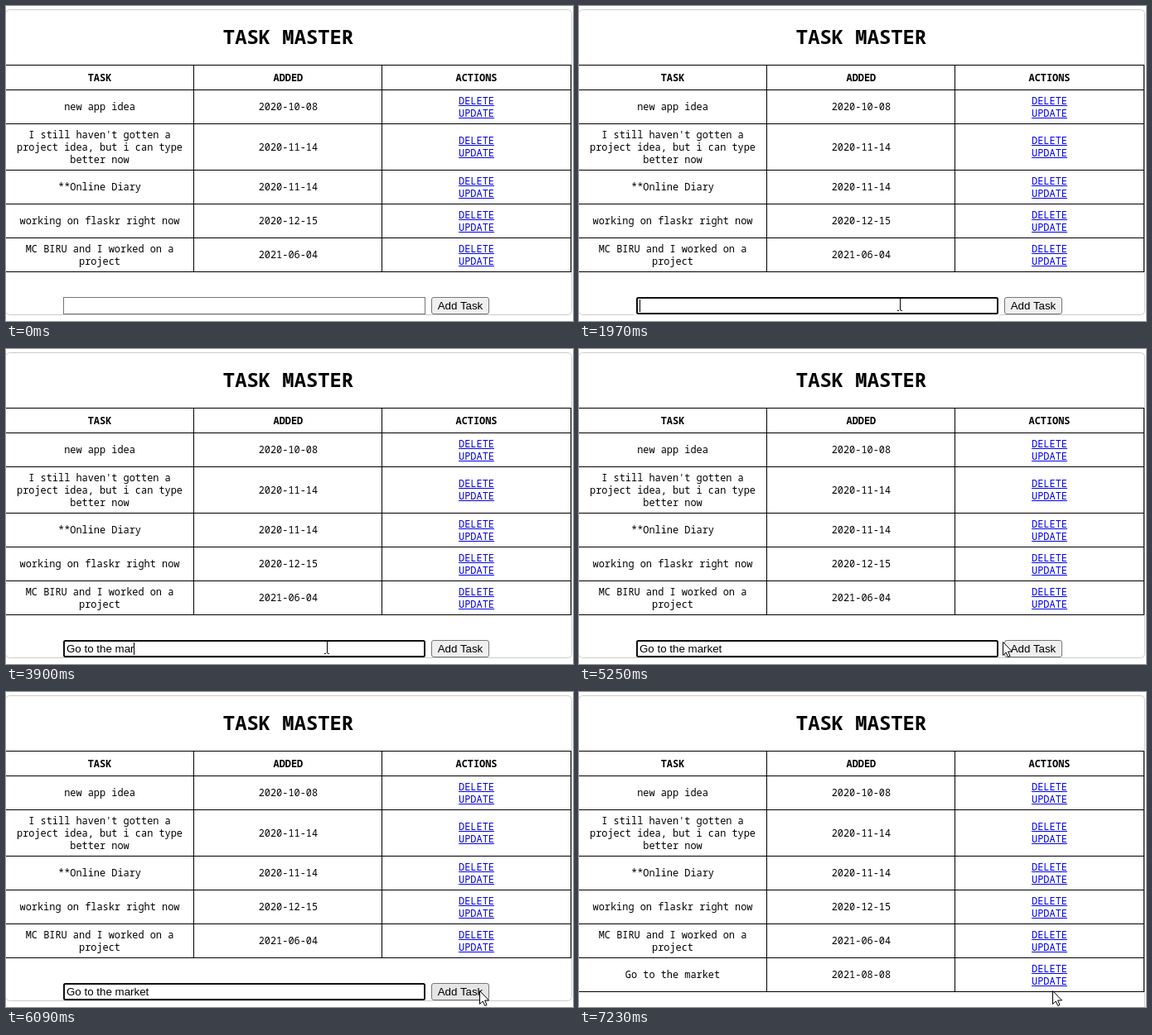
Animation of 684 by 381 pixels, one loop 8 s. Source, as an HTML page:

```html
<!DOCTYPE html>
<html lang="en">
<head>
<meta charset="utf-8">
<title>Task Master</title>
<style>
  html, body { margin: 0; width: 100%; height: 100%; overflow: hidden; background: #fff; }
  svg { display: block; width: 100%; height: 100%; }
  text { font: 11.92px "Noto Sans Mono", monospace; text-anchor: middle; white-space: pre; }
  .title { font-size: 23.83px; font-weight: 700; }
  .head { font-weight: 700; }
  .link { fill: #00e; }
  .control { font: 13.333px "Liberation Sans", Arial, sans-serif; }
  #typed { text-anchor: start; }
</style>
</head>
<body>
<svg viewBox="0 0 684 381">
  <rect id="card" x="-.5" y="4.5" width="683" height="369" rx="5" fill="#fff" stroke="#ccc"/>
  <text class="title" x="340.5" y="46">TASK MASTER</text>
  <g id="table"></g>
  <g id="newRow"></g>
  <g id="form">
    <rect id="field" fill="#fff"/>
    <text id="typed" class="control" x="73" y="367"></text>
    <rect id="caret" y="355" width="1" height="15"/>
    <rect id="button" x="513.5" y="352.5" width="69" height="20" rx="2.5" stroke="#767676"/>
    <text class="control" x="548" y="367">Add Task</text>
    <path id="popup" d="M66.5 382V373.5H507.5V382" fill="#fff" stroke="#f1f1f1"/>
  </g>
  <g id="pointer">
    <path id="arrow" d="M.5 .5V16.5L4.2 13 6.7 18.5 9 17.5 6.6 12H11.6Z" fill="#fff" stroke="#000"/>
    <path id="beam" d="M-3 -7.5H-1M1 -7.5H3M.5 -7V7M-3 7.5H-1M1 7.5H3" fill="none" stroke="#000"/>
  </g>
</svg>
<script>
const LOOP = 8000, BLINK = 530, STEP = 70;
const FOCUS = 550, SECOND_CLICK = 890, POPUP_CLOSE = 3670, PRESS = 6290, RELEASE = 6420, ADDED = 7230;
const COLUMNS = [113, 340.4, 567.5];
const TASK = 'Go to the market';
const KEY_TIMES = [2170, 2370, 2570, 2770, 2870, 2980, 3080, 3180, 3290, 3490, 3580, 3760, 3900, 4120, 4230, 4500];
const POINTER = [
  [270, 383, 375], [620, 387, 361], [4910, 387, 361], [5250, 511, 354],
  [5460, 594, 352], [5740, 583, 361], [6090, 571, 361]
];

const el = id => document.getElementById(id);
const show = (id, on) => el(id).setAttribute('display', on ? 'inline' : 'none');
const setAttrs = (id, attrs) => {
  for (const name in attrs) el(id).setAttribute(name, attrs[name]);
};

function cell(column, middle, lines, kind = '') {
  return lines.map((line, i) => {
    const x = COLUMNS[column];
    const y = Math.round(middle + 4.5 + 15 * (i - (lines.length - 1) / 2));
    const underline = kind === 'link' ? `<rect class="link" x="546" y="${y + 1}" width="43" height="1"/>` : '';
    return `<text class="${kind}" x="${x}" y="${y}">${line}</text>${underline}`;
  }).join('');
}

const grid = (top, bottom) =>
  `<path d="M0 ${bottom}.5H682M226.5 ${top}V${bottom}M453.5 ${top}V${bottom}M681.5 ${top}V${bottom}" stroke="#000"/>`;

function row(top, bottom, task, date) {
  const middle = (top + bottom) / 2;
  return grid(top, bottom) + cell(0, middle, task.split('|')) + cell(1, middle, [date]) +
    cell(2, middle, ['DELETE', 'UPDATE'], 'link');
}

el('table').innerHTML =
  '<path d="M0 71.5H682" stroke="#000"/>' + grid(71, 101) +
  ['TASK', 'ADDED', 'ACTIONS'].map((name, i) => cell(i, 86, [name], 'head')).join('') +
  row(101, 142, 'new app idea', '2020-10-08') +
  row(142, 198, "I still haven't gotten a|project idea, but i can type|better now", '2020-11-14') +
  row(198, 239, '**Online Diary', '2020-11-14') +
  row(239, 280, 'working on flaskr right now', '2020-12-15') +
  row(280, 321, 'MC BIRU and I worked on a|project', '2021-06-04');
el('newRow').innerHTML = row(321, 362, TASK, '2021-08-08');

// The pointer moves in small jumps, as in a screen recording.
function pointerAt(t) {
  const time = Math.floor(t / STEP) * STEP;
  const next = POINTER.findIndex(p => p[0] > time);
  if (next < 0) return POINTER[POINTER.length - 1].slice(1);
  if (next === 0) return POINTER[0].slice(1);
  const [t0, x0, y0] = POINTER[next - 1], [t1, x1, y1] = POINTER[next];
  const k = (time - t0) / (t1 - t0);
  return [Math.round(x0 + (x1 - x0) * k), Math.round(y0 + (y1 - y0) * k)];
}

function drawForm(t, overButton) {
  const focused = t >= FOCUS && t < PRESS;
  setAttrs('field', focused
    ? { x: 70, y: 353, width: 435, height: 19, rx: 1.5, stroke: '#101010', 'stroke-width': 2 }
    : { x: 69.5, y: 352.5, width: 436, height: 20, rx: 0, stroke: '#767676', 'stroke-width': 1 });

  const count = KEY_TIMES.filter(k => k <= t).length;
  el('typed').textContent = TASK.slice(0, count);
  const width = count ? el('typed').getComputedTextLength() : 0;
  el('caret').setAttribute('x', 73 + Math.floor(width));
  const lastInput = count ? KEY_TIMES[count - 1] : t >= SECOND_CLICK ? SECOND_CLICK : FOCUS;
  show('caret', focused && Math.floor((t - lastInput) / BLINK) % 2 === 0);

  const pressed = t >= PRESS && t < RELEASE;
  el('button').setAttribute('fill', pressed ? '#f5f5f5' : overButton ? '#e5e5e5' : '#efefef');

  show('popup', t >= SECOND_CLICK && t < POPUP_CLOSE);
  el('popup').setAttribute('opacity', Math.min(1, (1 + Math.floor((t - SECOND_CLICK) / 100)) / 3));
}

function draw(t) {
  const added = t >= ADDED;
  const [x, y] = pointerAt(t);
  const inside = (left, right) => x >= left && x < right && y >= 352 && y < 373;
  const overField = inside(69, 506);

  el('card').setAttribute('height', added ? 410 : 369);
  show('newRow', added);
  show('form', !added);
  drawForm(t, inside(513, 583));

  show('pointer', t >= POINTER[0][0]);
  show('beam', overField);
  show('arrow', !overField);
  el('pointer').setAttribute('transform', `translate(${x} ${y})`);
}

function tick() {
  draw(performance.now() % LOOP);
  requestAnimationFrame(tick);
}
tick();
</script>
</body>
</html>
```
